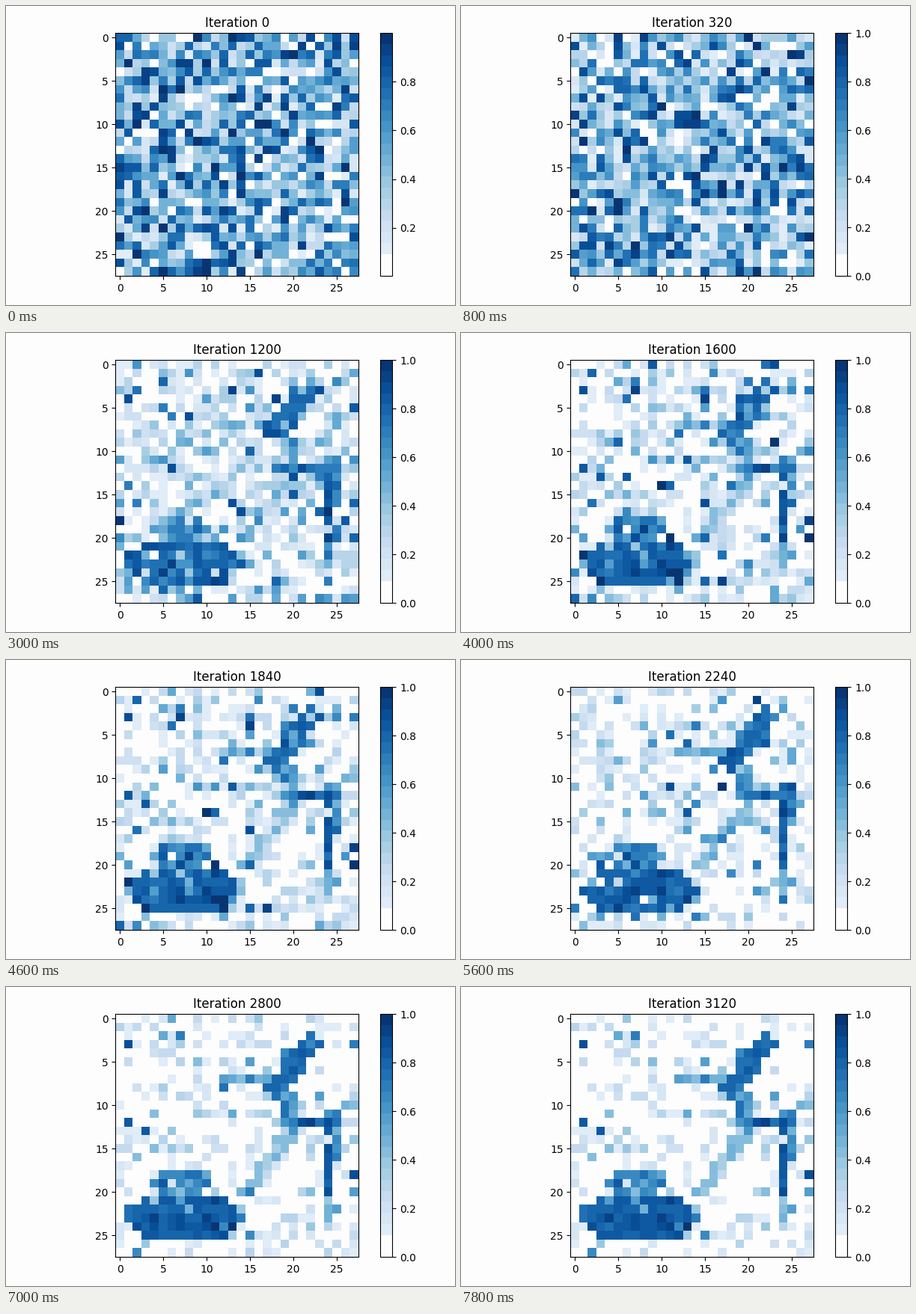
These frames come from a looping animation (600x400 px, 8 s). A matplotlib script:

```python
import numpy as np
import matplotlib.pyplot as plt
from matplotlib.animation import FuncAnimation
from matplotlib.colors import ListedColormap, to_rgba

W, H, DPI = 600, 400, 100
SIZE, FRAMES, STEP_MS, STEP_ITER = 28, 40, 200, 80
MAX_DRAWS = 60
PAPER = "#fdfdfe"
ROWS, COLS = np.indices((SIZE, SIZE))

plt.rcParams["font.family"] = "DejaVu Sans"


def stroke(cells, start, end, radius, shade):
    """Darken every cell within the radius of a line between two (row, col) points."""
    (r0, c0), (r1, c1) = start, end
    dr, dc = r1 - r0, c1 - c0
    along = ((ROWS - r0) * dr + (COLS - c0) * dc) / (dr * dr + dc * dc)
    along = along.clip(0, 1)
    near = np.hypot(ROWS - r0 - along * dr, COLS - c0 - along * dc) <= radius
    cells[near] = np.maximum(cells[near], shade)


def shoe():
    cells = np.zeros((SIZE, SIZE))
    stroke(cells, (23, 3), (23, 12), 2.1, .82)        # sole
    stroke(cells, (19, 5.5), (19, 8.5), 1.5, .66)     # toes
    stroke(cells, (3, 22), (8, 18), 1.1, .78)         # upper strap
    stroke(cells, (7, 12), (7, 17), .5, .5)
    stroke(cells, (8, 19), (13, 20), .9, .6)          # ankle
    stroke(cells, (13, 20), (20, 14.5), .7, .45)      # lower strap
    stroke(cells, (12, 20), (12, 25), .5, .75)
    stroke(cells, (11, 24.5), (16, 24.5), .6, .65)    # heel
    stroke(cells, (12, 24), (20, 24), .4, .85)
    stroke(cells, (20, 24), (24, 24), .4, .45)
    return cells


def lineage(seed, target):
    """Return the cells after 1, 2, ... redraws, and each cell's redraw rate."""
    rng = np.random.default_rng(seed)
    draws = rng.random((MAX_DRAWS, SIZE, SIZE))
    rate = rng.gamma(1.4, 1 / 1.4, (SIZE, SIZE))
    history = [draws[0]]
    for draw in draws[1:]:
        best = history[-1]
        closer = abs(draw - target) < abs(best - target)
        history.append(np.where(closer, draw, best))
    return np.array(history), rate


START = np.random.default_rng(5).random((SIZE, SIZE))
TARGET = shoe()
LINEAGES = [lineage(seed, TARGET) for seed in (11, 12, 13)]


def cells_at(frame):
    if frame == 0:
        return START
    history, rate = LINEAGES[max(0, frame - 15) // 5 % len(LINEAGES)]
    draws = (rate * .12 * frame ** 1.35).clip(0, MAX_DRAWS - 1).astype(int)
    return history[draws, ROWS, COLS]


def banded_blues(levels=22):
    colors = plt.get_cmap("Blues")((np.arange(levels) + .5) / levels)
    colors[:2] = to_rgba(PAPER)
    return ListedColormap(colors)


def box(left, top, width, height):
    return [left / W, 1 - (top + height) / H, width / W, height / H]


fig = plt.figure(figsize=(W / DPI, H / DPI), dpi=DPI, facecolor=PAPER)
ax = fig.add_axes(box(146.3, 36.33, 324.95, 324.95))
bar_ax = fig.add_axes(box(500.1, 36.33, 16.25, 324.95))
image = ax.imshow(START, cmap=banded_blues(), vmin=0, vmax=1,
                  interpolation="nearest")
fig.colorbar(image, cax=bar_ax)
title = ax.set_title("Iteration 0")


def update(frame):
    image.set_data(cells_at(frame))
    # The scale starts on the range of the noise, then covers 0 to 1.
    image.set_clim(*((.002, .999) if frame == 0 else (0, 1)))
    title.set_text(f"Iteration {frame * STEP_ITER}")
    return image, title


anim = FuncAnimation(fig, update, frames=FRAMES, interval=STEP_MS,
                     repeat=True, repeat_delay=0, blit=False)
plt.show()
```
